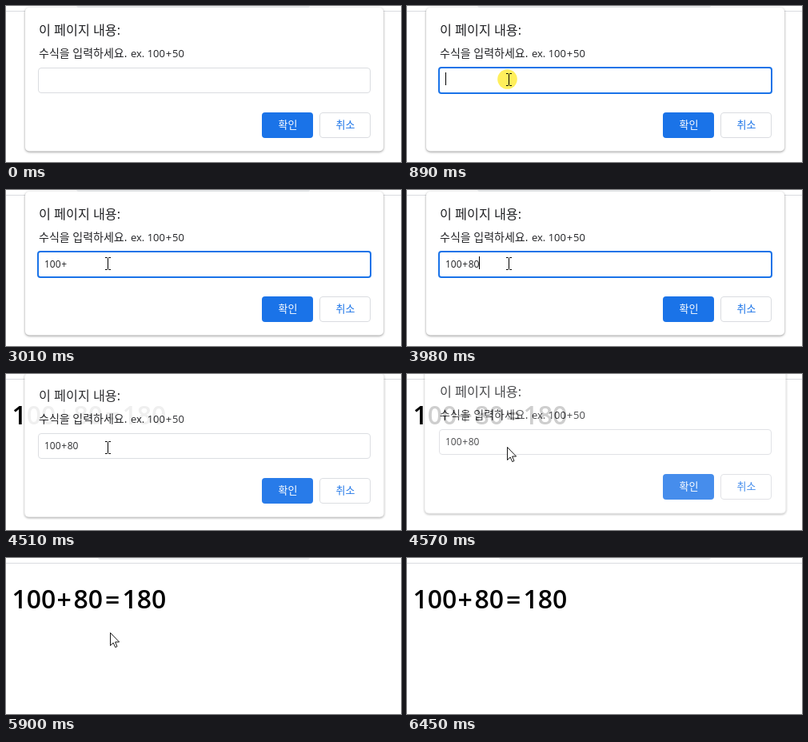
An HTML page for the animation above (7040 ms loop, 494 by 195 pixels).

```html
<!DOCTYPE html>
<html lang="ko">
<head>
<meta charset="utf-8">
<title>수식 계산</title>
<style>
html, body { margin: 0; width: 100%; height: 100%; overflow: hidden; background: #fff; }
svg { display: block; width: 494px; height: 195px; }
text { font-family: "Open Sans", "Noto Sans CJK KR", "Noto Sans CJK", sans-serif; fill: #202124; white-space: pre; }

.anim { animation: 7.04s step-end infinite; }
.dialog { animation-name: dialog; }
.panel { transform-origin: 248px 92px; animation-name: grow; filter: drop-shadow(0 1px 1.5px rgba(0, 0, 0, .42)); }
.focus { animation-name: focus; }
.entry { animation-name: entry; }
.caret { animation-name: caret; }
.result { animation-name: result; }
.result text { font-size: 32px; font-weight: 600; fill: #000; }
.oldbar { animation-name: oldbar; }
.click { animation-name: click; }
.cursor { animation-name: cursor; }
.arrow { animation-name: arrow; }
.beam { animation-name: beam; }

/* prompt closing: everything lifts and fades, the panel also grows */
@keyframes dialog {
  0% { opacity: 1; transform: none; }
  64.06% { opacity: .94; transform: translateY(-3px); }
  64.91% { opacity: .81; transform: translateY(-8px); }
  65.9% { opacity: .3; transform: translateY(-13px); }
  66.9%, 100% { opacity: 0; transform: translateY(-15px); }
}
@keyframes grow {
  0% { transform: none; }
  64.06% { transform: scale(1.003); }
  64.91% { transform: scale(1.008); }
  65.9%, 100% { transform: scale(1.012); }
}
@keyframes focus {
  0% { opacity: 0; }
  12.64% { opacity: 1; }
  64.06%, 100% { opacity: 0; }
}
/* typing: the cover slides right, one character at a time */
@keyframes entry {
  0% { transform: translateX(48px); }
  24% { transform: translateX(55px); }
  25.85% { transform: translateX(62px); }
  28.69% { transform: translateX(68px); }
  35.22% { transform: translateX(77px); }
  53.69% { transform: translateX(83px); }
  56.53%, 100% { transform: translateX(90px); }
}
@keyframes caret {
  0% { opacity: 0; }
  12.64% { opacity: 1; }
  20.17% { opacity: 0; }
  24% { opacity: 1; }
  42.75% { opacity: 0; }
  49.99% { opacity: 1; }
  64.06%, 100% { opacity: 0; }
}
@keyframes result {
  0% { opacity: 0; }
  64.06%, 100% { opacity: 1; }
}
@keyframes oldbar {
  0% { opacity: 1; }
  64.91%, 100% { opacity: 0; }
}
@keyframes click {
  0% { opacity: 0; }
  12.64% { opacity: 1; }
  13.49%, 100% { opacity: 0; }
}
/* pointer glides in, rests, glides out */
@keyframes cursor {
  0% { opacity: 0; transform: translate(332px, 182px); }
  2.84% { opacity: 1; transform: translate(332px, 182px); }
  3.83% { opacity: 1; transform: translate(300px, 166px); }
  4.82% { opacity: 1; transform: translate(252px, 146px); }
  5.82% { opacity: 1; transform: translate(205px, 126px); }
  6.81% { opacity: 1; transform: translate(170px, 111px); }
  7.81% { opacity: 1; transform: translate(146px, 100px); }
  8.8% { opacity: 1; transform: translate(132px, 94px); }
  9.8% { opacity: 1; transform: translate(125px, 91px); }
  83.8% { opacity: 1; transform: translate(130px, 93px); }
  84.8% { opacity: 1; transform: translate(146px, 99px); }
  85.79% { opacity: 1; transform: translate(176px, 111px); }
  86.78% { opacity: 1; transform: translate(218px, 125px); }
  87.78% { opacity: 1; transform: translate(268px, 141px); }
  88.77% { opacity: 1; transform: translate(324px, 156px); }
  89.77% { opacity: 1; transform: translate(380px, 170px); }
  90.76% { opacity: 1; transform: translate(430px, 184px); }
  91.61%, 100% { opacity: 0; transform: translate(430px, 184px); }
}
@keyframes arrow {
  0% { opacity: 1; }
  7.81% { opacity: 0; }
  64.91%, 100% { opacity: 1; }
}
@keyframes beam {
  0% { opacity: 0; }
  7.81% { opacity: 1; }
  64.91%, 100% { opacity: 0; }
}
</style>
</head>
<body>
<svg viewBox="0 0 494 195">
  <rect width="494" height="195" fill="#fff"/>
  <rect x="115" y="-5" width="265" height="7" rx="3" fill="#eceef0"/>
  <rect class="anim oldbar" x="88" y="-5" width="292" height="7" rx="3" fill="#eceef0"/>
  <rect y="6" width="494" height="1" fill="#dadce0"/>

  <g class="anim result">
    <text x="7.5" y="63">100</text>
    <text x="63.5" y="64">+</text>
    <text x="84.5" y="63">80</text>
    <text x="124" y="64">=</text>
    <text x="145.5" y="63">180</text>
  </g>

  <g class="anim dialog">
    <rect class="anim panel" x="24" y="2" width="448" height="179.5" rx="5" fill="#fff"/>
    <text x="41" y="36" font-size="16.2">이 페이지 내용:</text>
    <text x="41" y="64" font-size="14">수식을 입력하세요.</text>
    <text x="156" y="64" font-size="13">ex. 100<tspan dx=".8">+</tspan><tspan dx=".8">50</tspan></text>

    <rect x="40.5" y="77.5" width="415" height="31" rx="3.5" fill="#fff" stroke="#dadce0"/>
    <rect class="anim focus" x="40" y="77" width="416" height="32" rx="3" fill="#fff" stroke="#1a73e8" stroke-width="2"/>
    <text x="48" y="97" font-size="12">100<tspan dx=".6">+</tspan><tspan dx=".6">80</tspan></text>
    <g class="anim entry">
      <rect y="83" width="48" height="16" fill="#fff"/>
      <rect class="anim caret" y="83" width="1" height="16" fill="#000"/>
    </g>

    <rect x="320" y="133" width="64" height="32" rx="4" fill="#1a73e8"/>
    <text x="340.5" y="153" font-size="13" font-weight="500" style="fill:#fff">확인</text>
    <rect x="392.5" y="133.5" width="63" height="31" rx="3.5" fill="#fff" stroke="#dadce0"/>
    <text x="412.5" y="153" font-size="13" style="fill:#1a73e8">취소</text>
  </g>

  <circle class="anim click" cx="125.5" cy="91.5" r="12.3" fill="#ffef5c"/>
  <g class="anim cursor">
    <path class="anim arrow" d="M.5 .5V16.5L4.2 13 6.7 18.6 9 17.6 6.6 12H11.6Z" fill="#fff" stroke="#000" stroke-width=".9"/>
    <path class="anim beam" d="M-1-6.5H1.5L2.5-5.5 3.5-6.5H6M2.5-5.5V7.5M-1 8.5H1.5L2.5 7.5 3.5 8.5H6" fill="none" stroke="#000"/>
  </g>
</svg>
</body>
</html>
```
